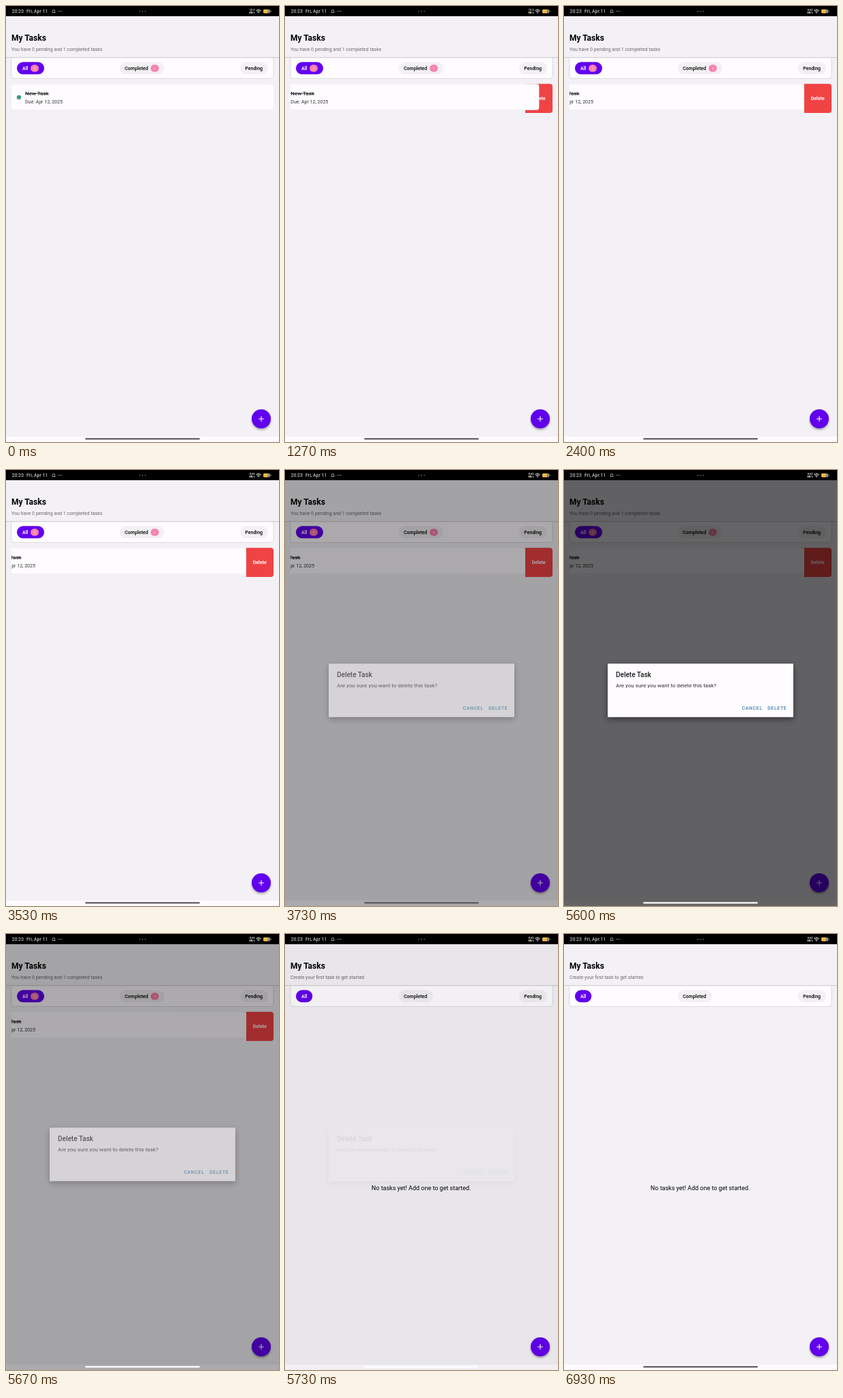
These frames come from a looping animation (400x640 px, 7000 ms). An HTML page:

```html
<!DOCTYPE html>
<html lang="en">
<head>
<meta charset="utf-8">
<title>My Tasks</title>
<style>
  html, body { margin: 0; width: 100%; height: 100%; overflow: hidden; background: #f3f1f5; }
  svg { display: block; width: 400px; height: 640px; font: 7px Roboto, sans-serif; }
  .medium { font-weight: 500; }
  .bold { font-weight: 700; }
  .card { fill: #fefcff; filter: drop-shadow(0 .5px .6px #0003); }
  .chip { fill: #f2f0f3; }
  .accent { fill: #6200ee; }
  .badge { fill: #fb7fab; }
  .white { fill: #fff; }
  .button { fill: #4682ae; font-weight: 500; letter-spacing: .6px; }
</style>
</head>
<body>
<svg viewBox="0 0 400 640">
  <defs>
    <clipPath id="rowClip"><path d="M8 113H392V158H8z"/></clipPath>
    <g id="count">
      <ellipse class="badge" rx="6" ry="5.4"/>
      <text class="white" y="2.1" font-size="6" text-anchor="middle">1</text>
    </g>
  </defs>

  <rect width="400" height="640" fill="#f3f1f5"/>
  <rect y="632" width="400" height="8" fill="#fdfbfe"/>

  <!-- header and filters -->
  <rect class="card" x="8" y="74" width="384" height="32.5" rx="4" stroke="#d5d3d7" stroke-width=".6"/>
  <rect y="15" width="400" height="60.5" fill="#f3f1f5"/>
  <path d="M0 75.7H400" stroke="#c9c7cb" stroke-width="1"/>
  <text class="bold" x="8" y="51" font-size="12">My Tasks</text>
  <text id="subtitle" x="8" y="66" fill="#6b696c"></text>

  <rect id="allChip" class="accent" x="16" y="82.3" height="18" rx="9"/>
  <text class="white bold" x="24" y="94">All</text>
  <rect id="doneChip" class="chip" x="166.7" y="82.3" height="18" rx="9"/>
  <text class="medium" x="174" y="94">Completed</text>
  <rect class="chip" x="343" y="82.3" width="41" height="18" rx="9"/>
  <text class="medium" x="350.3" y="94">Pending</text>

  <!-- task list -->
  <g id="list">
    <use href="#count" x="42" y="91.4"/>
    <use href="#count" x="218" y="91.4"/>
    <g clip-path="url(#rowClip)">
      <g id="remove">
        <path d="M352 114.3H388a4 4 0 0 1 4 4V153a4 4 0 0 1-4 4H352z" fill="#f04344"/>
        <text class="white bold" x="371.8" y="138.2" text-anchor="middle">Delete</text>
      </g>
      <g id="row">
        <rect class="card" x="8" y="114.3" width="384" height="38.5" rx="4"/>
        <circle cx="18.7" cy="134.4" r="3.3" fill="#a9b5b3"/>
        <circle cx="19.2" cy="133.7" r="2.8" fill="#379683"/>
        <text class="medium" x="28" y="131" font-size="8" fill="#222" text-decoration="line-through">New Task</text>
        <text x="28" y="142.7" fill="#333">Due: Apr 12, 2025</text>
      </g>
    </g>
  </g>
  <text id="empty" x="199.7" y="376.3" font-size="9" text-anchor="middle">No tasks yet! Add one to get started.</text>

  <!-- add button -->
  <circle class="accent" cx="374" cy="606" r="14" style="filter: drop-shadow(0 2px 1.5px #0005)"/>
  <path d="M370 606h8M374 602v8" stroke="#fff" stroke-width="1.1"/>

  <!-- confirmation -->
  <rect id="dim" y="15" width="400" height="625"/>
  <g id="dialog">
    <rect x="64" y="284.3" width="272" height="78.5" rx="1" fill="#fffcff" style="filter: drop-shadow(0 3px 4px #0007)"/>
    <text class="medium" x="76" y="304" font-size="10" fill="#1c1b1d">Delete Task</text>
    <text x="76" y="319" font-size="8" fill="#2c2a2d">Are you sure you want to delete this task?</text>
    <text class="button" x="260.7" y="351.5">CANCEL</text>
    <text class="button" x="298.2" y="351.5">DELETE</text>
  </g>

  <!-- system bars -->
  <rect id="handle" x="116" y="634.2" width="168" height="2.2" rx="1.1"/>
  <rect width="400" height="15"/>
  <g fill="#eee">
    <text x="8.5" y="10.2">20:23</text>
    <text x="30" y="10.2">Fri, Apr 11</text>
    <path d="M67.5 9.5h5M68.2 8.6q0-3.2 1.8-3.2t1.8 3.2" fill="none" stroke="#bbb" stroke-width=".9"/>
    <path d="M76.5 7.7h6" stroke="#ccc" stroke-width="1.1" stroke-dasharray="1.1 1.2"/>
    <path d="M195.5 7.7h10" stroke="#777" stroke-width="1.4" stroke-dasharray="1.4 2.6"/>
    <g class="bold" font-size="3.8" text-anchor="middle">
      <text id="speed" x="360.5" y="7.2"></text>
      <text x="360.5" y="10.8">KB/s</text>
    </g>
    <path d="M366.3 6.8q3.7-3 7.4 0M367.6 8.5q2.4-2 4.8 0M369 10.1q1-.8 2 0" fill="none" stroke="#eee" stroke-width="1"/>
    <rect x="377" y="5" width="10.3" height="5.6" rx="1.6" fill="#8a8a8a"/>
    <path d="M378.6 5H383.5V10.6H378.6a1.6 1.6 0 0 1-1.6-1.6V6.6a1.6 1.6 0 0 1 1.6-1.6z" fill="#f3b63c"/>
    <path d="M388.3 6.8v2" stroke="#999" stroke-width=".8"/>
  </g>
</svg>
<script>
const LOOP = 7000, FPS = 15;
const el = id => document.getElementById(id);
const set = (id, attrs) => Object.entries(attrs).forEach(([k, v]) => el(id).setAttribute(k, v));
const show = (id, on) => set(id, { visibility: on ? 'visible' : 'hidden' });
const progress = (t, from, to) => Math.min(1, Math.max(0, (t - from) / (to - from)));
const smooth = u => u * u * (3 - 2 * u);

function draw(t) {
  const swipe = smooth(progress(t, 600, 1950));
  const opened = 1 - (1 - progress(t, 3667, 3870)) ** 2;
  const alpha = opened * (1 - progress(t, 5600, 5745));
  const full = t < 5700;

  set('row', { transform: `translate(${-40 * swipe})` });
  show('remove', full && swipe > 0);
  show('list', full);
  show('empty', !full);
  set('allChip', { width: full ? 40 : 24.3 });
  set('doneChip', { width: full ? 65.3 : 50 });
  el('subtitle').textContent = full
    ? 'You have 0 pending and 1 completed tasks'
    : 'Create your first task to get started';
  el('speed').textContent = t < 1660 ? '12.3' : '0.62';

  set('dim', { opacity: .6 * alpha });
  set('dialog', { opacity: alpha });
  set('handle', { fill: t > 3860 && t < 5790 ? '#fff' : alpha > .8 ? '#2b292c' : '#5c5a5d' });
}

const start = performance.now();
function tick() {
  const t = (performance.now() - start) % LOOP;
  draw(Math.floor((t + 4) * FPS / 1000) * 1000 / FPS);
  requestAnimationFrame(tick);
}
tick();
</script>
</body>
</html>
```
